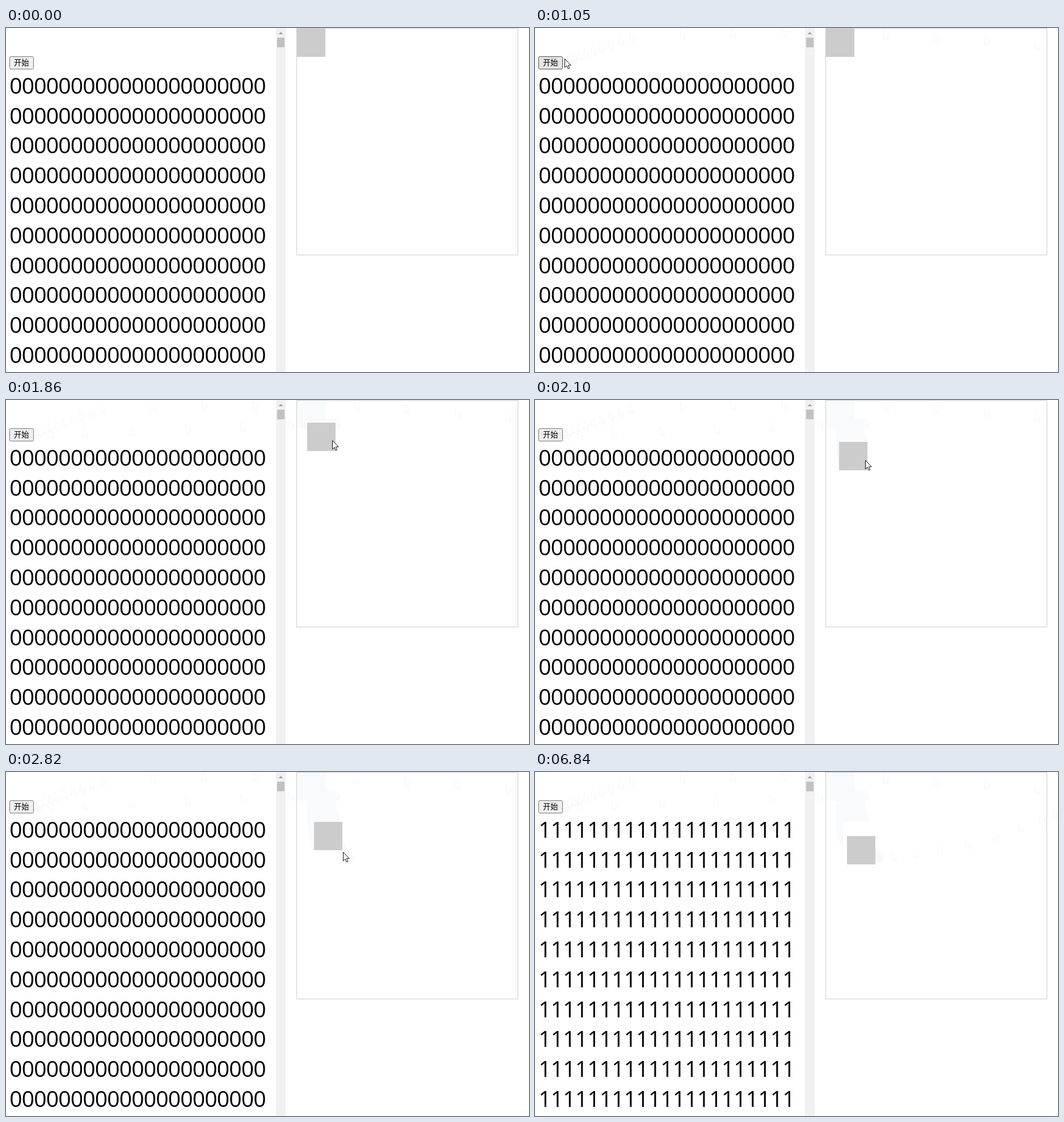
These frames come from a looping animation (922x607 px, 7.35 s). An HTML page with a canvas:

```html
<!DOCTYPE html>
<html lang="zh">
<head>
<meta charset="utf-8">
<title>拖动</title>
<style>
  html, body { margin: 0; width: 100%; height: 100%; overflow: hidden; background: #fff; }
  canvas { display: block; }
</style>
</head>
<body>
<canvas id="stage" width="922" height="607"></canvas>
<script>
const ctx = document.getElementById('stage').getContext('2d');
const LOOP = 7350, STEP = 30;
const ENTER = 30, DRAG = 1830, BLOCK = 2220, UNBLOCK = 5520, LEAVE = 6840;
const GREY = '#ccc', GHOST = '#f7f7f8', TINT = '#f8fafc';
const SIDE = 50;

const linear = u => u;
const easeOut = u => 1 - (1 - u) ** 2;
const smooth = u => u * u * (3 - 2 * u);
const middle = (a, b) => a.map((v, i) => (v + b[i]) / 2);

// A move follows a quadratic curve and then rests at its end
const move = (start, end, from, to, ease = linear, via = middle(from, to)) =>
  ({ start, end, from, to, ease, via });

const pointerMoves = [
  move(ENTER, 270, [881, 22], [166, 7], linear, [525, -12]),
  move(270, 660, [166, 7], [38, 54], easeOut),
  move(1050, 1290, [52, 54], [580, 32], smooth),
  move(1290, 1470, [580, 32], [557, 31], smooth),
  move(1620, 1860, [557, 31], [575, 71]),
  move(1860, 2370, [575, 71], [601, 137], linear, [577, 112]),
  move(2370, 2460, [601, 137], [604, 141]),
  move(2670, 2820, [604, 141], [594, 141]),
  move(6540, LEAVE, [594, 141], [922, 60], smooth, [760, 135])
];
const squareMoves = [
  move(0, 0, [513, 1], [513, 1]),
  move(DRAG, BLOCK, [531, 35], [543, 88], linear, [530, 67]),
  move(UNBLOCK, UNBLOCK, [550, 113], [550, 113])
];

function at(moves, t) {
  const { start, end, from, to, ease, via } = moves.findLast(m => m.start <= t);
  const p = t < end ? ease((t - start) / (end - start)) : 1;
  const q = 1 - p;
  return from.map((v, i) => Math.round(q * q * v + 2 * p * q * via[i] + p * p * to[i]));
}

function rect(color, x, y, w, h) {
  ctx.fillStyle = color;
  ctx.fillRect(x, y, w, h);
}

const drawSquare = (color, t) => rect(color, ...at(squareMoves, t), SIDE, SIDE);

const arrow = new Path2D('M.5 .5V15.8L4 12.6L6.4 18L8.8 17L6.4 11.8H11.3Z');

function drawArrow([x, y], stroke, fill) {
  ctx.save();
  ctx.translate(x, y);
  if (fill) {
    ctx.fillStyle = fill;
    ctx.fill(arrow);
  }
  ctx.strokeStyle = stroke;
  ctx.lineWidth = 1;
  ctx.stroke(arrow);
  ctx.restore();
}

// Faint traces left behind by the moving pointer and square
function drawTraces(t) {
  for (let s = ENTER; s < Math.min(t, LEAVE); s += STEP) {
    const here = at(pointerMoves, s);
    if (String(here) !== String(at(pointerMoves, s + STEP))) drawArrow(here, GHOST);
  }
  if (t >= DRAG) drawSquare(TINT, 0);
  for (let s = DRAG; s < Math.min(t, BLOCK); s += STEP) drawSquare(TINT, s);
  if (t >= UNBLOCK) drawSquare('#fff', BLOCK);
}

function drawButton(hover) {
  ctx.beginPath();
  ctx.roundRect(6.5, 50.5, 42, 22, 2);
  ctx.fillStyle = hover ? '#e5e5e5' : '#efefef';
  ctx.fill();
  ctx.strokeStyle = hover ? '#4f4f4f' : '#767676';
  ctx.lineWidth = 1;
  ctx.stroke();
  ctx.fillStyle = '#000';
  ctx.font = '13.33px "Noto Sans CJK SC", "Noto Sans CJK", sans-serif';
  ctx.textAlign = 'center';
  ctx.fillText('开始', 27.3, 66);
}

function drawDigits(digit) {
  ctx.fillStyle = '#000';
  ctx.font = '39px "Open Sans", sans-serif';
  ctx.textAlign = 'left';
  for (let row = 0; row < 10; row++) {
    for (let col = 0; col < 21; col++) {
      ctx.fillText(digit, 6.2 + col * 21.5, 115.8 + row * 52.8);
    }
  }
}

function drawScrollbar() {
  rect('#f1f1f1', 476, 0, 17, 607);
  rect('#c1c1c1', 478, 17, 13, 17);
  ctx.fillStyle = '#a3a3a3';
  ctx.beginPath();
  ctx.moveTo(480.5, 11);
  ctx.lineTo(484.5, 7);
  ctx.lineTo(488.5, 11);
  ctx.fill();
}

function draw(t) {
  rect('#fff', 0, 0, 922, 607);
  drawTraces(t);
  drawScrollbar();
  drawButton(t >= 540 && t < 1080);
  drawDigits(t < UNBLOCK ? '0' : '1');
  ctx.strokeStyle = GREY;
  ctx.lineWidth = 1;
  ctx.strokeRect(512.5, 0.5, 390, 400);
  drawSquare(GREY, t);
  if (t >= ENTER && t < LEAVE) drawArrow(at(pointerMoves, t), '#0c0c18', '#fff');
}

const begin = performance.now();
function tick() {
  const t = (performance.now() - begin) % LOOP;
  draw(Math.floor(t / STEP) * STEP);
  requestAnimationFrame(tick);
}
tick();
</script>
</body>
</html>
```
